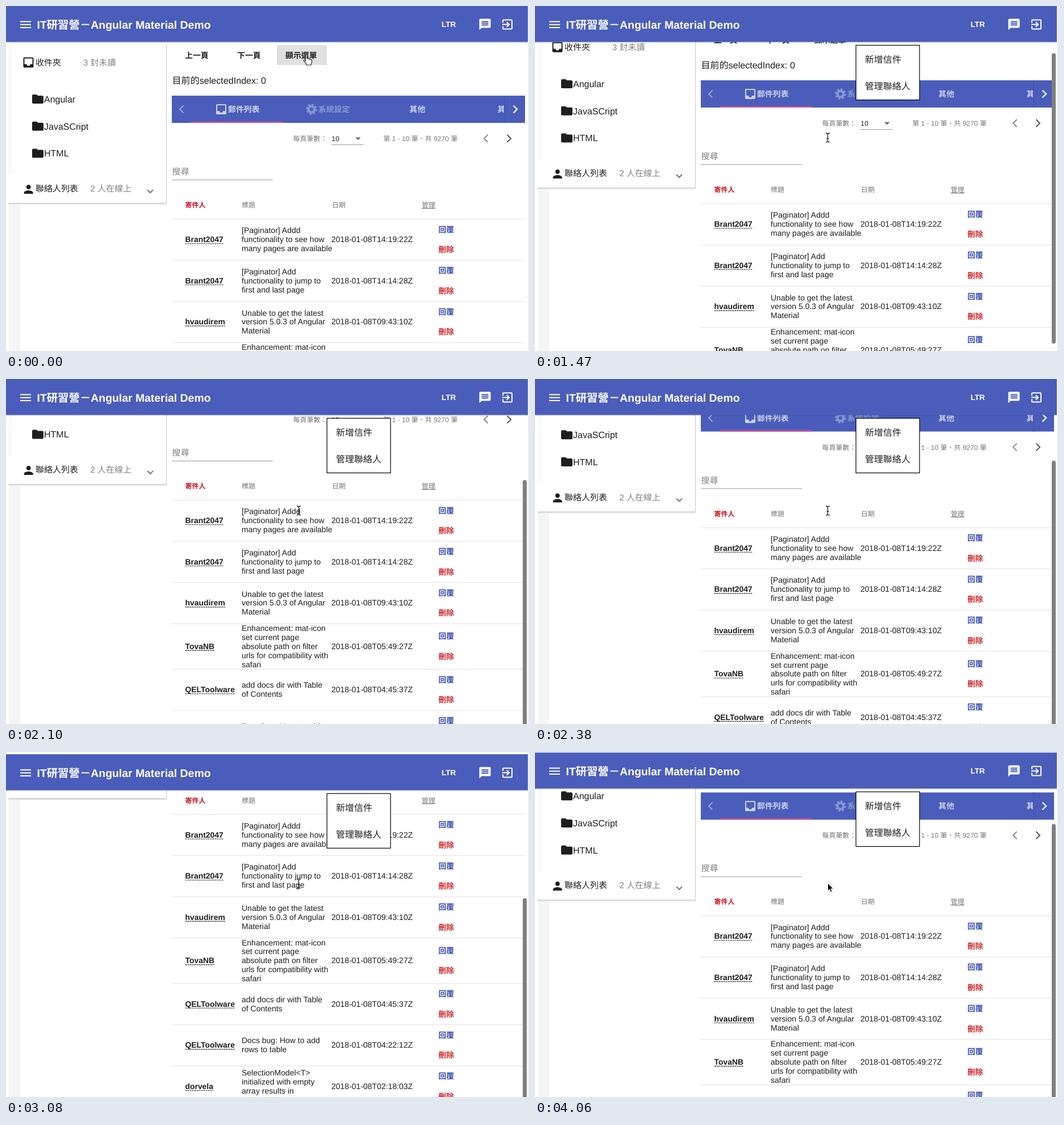
Recreate the animation shown at these times as an HTML page. Size 921 by 608 pixels, loop 4130 ms.

```html
<!DOCTYPE html>
<html lang="zh-Hant">
<head>
<meta charset="utf-8">
<style>
html, body { margin: 0; width: 100%; height: 100%; overflow: hidden; background: #fff; }
svg { display: block; width: 921px; height: 608px; text-rendering: geometricPrecision;
  font-family: 'Liberation Sans', 'Noto Sans CJK TC', 'Noto Sans CJK', sans-serif; }
</style>
</head>
<body>
<svg id="stage" viewBox="0 0 921 608"></svg>
<script>
const LOOP = 4130, STEP = 70, BLUE = '#4a5dba', INK = '#1e1e1e', GRAY = '#808080', PALE = '#cdd3ec';

const text = (x, y, s, size = 14, fill = INK, weight = 400, more = '') =>
  `<text x="${x}" y="${y}" font-size="${size}" fill="${fill}" font-weight="${weight}" ${more}>${s}</text>`;
const rect = (x, y, w, h, fill, more = '') =>
  `<rect x="${x}" y="${y}" width="${w}" height="${h}" fill="${fill}" ${more}/>`;
const stroke = (d, color, width = 1, more = '') =>
  `<path d="${d}" fill="none" stroke="${color}" stroke-width="${width}" ${more}/>`;
const icon = (name, x, y, fill = INK) =>
  `<path d="${ICONS[name]}" fill="${fill}" transform="translate(${x} ${y})"/>`;

const ICONS = {
  menu: 'M2.5 18.5h19v-2h-19zM2.5 13.3h19v-2h-19zM2.5 6v2h19V6z',
  message: 'M20 2H4c-1.1 0-2 .9-2 2v18l4-4h14c1.1 0 2-.9 2-2V4c0-1.1-.9-2-2-2zm-2 12H6v-2h12zm0-3H6V9h12zm0-3H6V6h12z',
  exit: 'M10.1 15.6L11.5 17l5-5-5-5-1.4 1.4L12.7 11H3v2h9.7zM19 3H5c-1.1 0-2 .9-2 2v4h2V5h14v14H5v-4H3v4c0 1.1.9 2 2 2h14c1.1 0 2-.9 2-2V5c0-1.1-.9-2-2-2z',
  inbox: 'M19 3H5c-1.1 0-2 .9-2 2v14c0 1.1.9 2 2 2h14c1.1 0 2-.9 2-2V5c0-1.1-.9-2-2-2zm0 12h-4c0 1.7-1.4 3-3 3s-3-1.3-3-3H5V5h14z',
  folder: 'M10 4H4c-1.1 0-2 .9-2 2v12c0 1.1.9 2 2 2h16c1.1 0 2-.9 2-2V8c0-1.1-.9-2-2-2h-8z',
  person: 'M12 12c2.2 0 4-1.8 4-4s-1.8-4-4-4-4 1.8-4 4 1.8 4 4 4zm0 2c-2.7 0-8 1.3-8 4v2h16v-2c0-2.7-5.3-4-8-4z'
};

const ROWS = [
  ['Brant2047', '14:19:22', '[Paginator] Addd|functionality to see how|many pages are available'],
  ['Brant2047', '14:14:28', '[Paginator] Add|functionality to jump to|first and last page'],
  ['hvaudirem', '09:43:10', 'Unable to get the latest|version 5.0.3 of Angular|Material'],
  ['TovaNB', '05:49:27', 'Enhancement: mat-icon|set current page|absolute path on filter|urls for compatibility with|safari'],
  ['QELToolware', '04:45:37', 'add docs dir with Table|of Contents'],
  ['QELToolware', '04:22:12', 'Docs bug: How to add|rows to table'],
  ['dorvela', '02:18:03', 'SelectionModel&lt;T&gt;|initialized with empty|array results in|selected items']
];

function sidePanel() {
  const folders = ['Angular', 'JavaSCript', 'HTML'].map((name, i) => {
    const y = 152 + i * 47.7;
    return icon('folder', 44, y) + text(67, y + 18, name, 16);
  });
  return rect(5, 350, 20, 800, '#f5f5f5') +
    rect(4, 68, 279, 280.5, '#c8c8c8', 'rx="2"') + rect(4, 68, 278, 279, '#fff') +
    rect(4, 348.5, 279, 1.5, '#e6e6e6') +
    rect(4, 68, 8, 229, '#fafafa') +
    icon('inbox', 27.5, 87.5) + text(52, 104.5, '收件夾', 15) + text(136, 104.5, '3 封未讀', 15, GRAY) +
    folders.join('') +
    icon('person', 27.7, 311) + text(52, 327, '聯絡人列表', 15) + text(148.5, 327, '2 人在線上', 15, GRAY) +
    stroke('M249 324l5 5 5-5', '#777', 2);
}

function tabs() {
  const gear = `<g fill="none" stroke="#fff" opacity=".35"><circle cx="538" cy="182" r="5.2" stroke-width="4"/>
    <circle cx="538" cy="182" r="8" stroke-width="3.4" stroke-dasharray="3.4 2.883"/></g>`;
  return rect(292, 158, 622, 48, BLUE) +
    stroke('M312.5 175.5l-6.5 6.5 6.5 6.5', '#fff', 2, 'opacity=".45"') +
    icon('inbox', 367, 170, PALE) + text(391, 187, '郵件列表', 13.9, PALE, 700) +
    rect(326, 203.5, 162, 2.5, '#c9509c') + gear +
    text(550, 187, '系統設定', 13.9, '#fff', 700, 'opacity=".35"') +
    text(710.5, 187, '其他', 13.9, PALE, 700) + text(865.5, 187, '其', 13.9, PALE, 700) +
    rect(877, 158, 2, 48, '#4456b0') +
    stroke('M893.5 175.5l6.5 6.5-6.5 6.5', '#fff', 2.2);
}

function table() {
  let y = 375;
  const head = text(315.5, 355, '寄件人', 12, '#c8101c', 700) + text(415, 355, '標題', 12, '#777') +
    text(574, 355, '日期', 12, '#777') + text(732, 355, '管理', 12, '#777', 400, 'text-decoration="underline"');
  return head + ROWS.map(([name, time, title]) => {
    const lines = title.split('|'), h = lines.length > 4 ? 80.3 : 72.6, mid = y + h / 2 + .2;
    const out = rect(292, y, 622, 1, '#e2e2e2') +
      text(315.5, mid + 4.7, name, 13.9, INK, 700, 'class="name"') +
      lines.map((s, i) => text(415, mid + 4.7 + (i - (lines.length - 1) / 2) * 15.9, s)).join('') +
      text(573, mid + 4.7, `2018-01-08T${time}Z`) +
      text(761.5, mid - 13, '回覆', 13.8, '#3d4fae', 700) + text(761.5, mid + 22.7, '刪除', 13.8, '#cf2a30', 700);
    y += h;
    return out;
  }).join('') + rect(292, y, 622, 1, '#e2e2e2');
}

const content = sidePanel() +
  rect(477, 69, 88, 35, '#e0e0e0', 'id="hover"') +
  text(315, 91.5, '上一頁', 13.9, INK, 700) + text(407, 91.5, '下一頁', 13.9, INK, 700) +
  text(492, 91.5, '顯示選單', 13.9, INK, 700) +
  text(292.5, 137, '目前的selectedIndex: 0', 16.1) + tabs() +
  text(505.5, 238, '每頁筆數：', 12, '#777') + text(573.5, 238, '10', 12) +
  '<path d="M615 231.5h10l-5 5z" fill="#757575"/>' + rect(573, 244, 56, 1, '#999') +
  text(664.5, 238, '第 1 - 10 筆、共 9270 筆', 12, '#777') +
  stroke('M848.5 227l-6.5 6.5 6.5 6.5', '#888', 2) + stroke('M882.5 227l6.5 6.5-6.5 6.5', '#555', 2) +
  text(292.5, 297, '搜尋', 15, GRAY) + rect(292, 306, 178, 1, '#999') + table();

const header = rect(0, -10, 921, 10, '#fff') + rect(0, 63.5, 919, 2, '#000', 'opacity=".08"') +
  rect(0, 0, 919, 63.5, BLUE) + icon('menu', 22.5, 20.5, '#fff') +
  text(54.5, 40, 'IT研習營－Angular Material Demo', 19.4, '#fff', 700) +
  text(767, 37, 'LTR', 13.5, '#fff', 700) +
  icon('message', 831.5, 20.5, '#fff') + icon('exit', 871, 20.5, '#fff');

const menu = rect(565.2, 69.2, 112, 96.3, '#fff', 'stroke="#000" stroke-width="1.2"') +
  text(581, 99.5, '新增信件', 16) + text(581, 147, '管理聯絡人', 16);

// Pointer shapes with the hot spot at 0,0
const pointers = {
  hand: '<path d="M-3.5-7c0-2 2.6-2 2.6 0v5.5c2-1 3 0 3 1 1.5-.8 2.7 0 2.7 1 1.5-.6 2.7.2 2.7 1.5v3c0 2-1.5 2.5-1.5 5h-7.5c0-2.5-4-5-5-7.5-.6-1.8 1.5-2.5 3 0z" fill="#fff" stroke="#222" stroke-width="1.2"/>',
  beam: stroke('M-3.5-8q3.5 0 3.5 2.5v11q0 2.5-3.5 2.5M3.5-8q-3.5 0-3.5 2.5v11q0 2.5 3.5 2.5M-2 1.5h4', '#222', 1.3),
  arrow: '<path d="M0-1v14l3.2-3 2.2 5 2.4-1-2.2-4.9h4.4z" fill="#111" stroke="#fff"/>'
};

const stage = document.getElementById('stage');
stage.innerHTML = `<g id="content">${content}</g><g id="header">${header}</g><g id="menu">${menu}</g>` +
  rect(910, 0, 7, 512, '#808080', 'id="thumb" rx="3.5"') + rect(919, 0, 2, 608, '#f0f0f0') +
  '<g id="pointer">' + Object.keys(pointers).map(k => `<g id="${k}">${pointers[k]}</g>`).join('') + '</g>';
const el = id => document.getElementById(id);
const show = (id, on) => el(id).setAttribute('visibility', on ? 'visible' : 'hidden');
const move = (id, x, y) => el(id).setAttribute('transform', `translate(${x} ${y})`);

// Dashed underline as wide as each sender's name
document.querySelectorAll('.name').forEach(n => {
  const y = +n.getAttribute('y') + 2.5;
  n.insertAdjacentHTML('afterend',
    stroke(`M315.5 ${y}h${n.getComputedTextLength()}`, INK, 1.1, 'stroke-dasharray="3 1"'));
});

// Smooth curve through [time, value] keys, flat at turning points
function curve(keys, t) {
  const last = keys.length - 1;
  if (t <= keys[0][0]) return keys[0][1];
  if (t >= keys[last][0]) return keys[last][1];
  const slope = i => {
    if (i === 0 || i === last) return 0;
    const [a, b, c] = keys.slice(i - 1, i + 2);
    return (b[1] - a[1]) * (c[1] - b[1]) <= 0 ? 0 : (c[1] - a[1]) / (c[0] - a[0]);
  };
  const i = keys.findIndex(k => k[0] > t) - 1;
  const [t0, v0] = keys[i], [t1, v1] = keys[i + 1], d = t1 - t0, u = (t - t0) / d;
  const s = u * u * (3 - 2 * u);
  return v0 + (v1 - v0) * s + d * u * (1 - u) * (slope(i) * (1 - u) - slope(i + 1) * u);
}

const SCROLL = [[1190, 0], [1470, 27], [2100, 162], [2240, 175], [2590, 0], [2660, 0], [2730, 2],
  [3080, 269.5], [3150, 275], [3640, 159], [4060, 87.7], [4130, 80]];
const BOUNCE = [[2520, 0], [2660, 4], [3920, 4], [4060, 1]];

function draw(now) {
  const t = Math.floor(now % LOOP / STEP) * STEP;
  const scroll = curve(SCROLL, t), shift = curve(BOUNCE, t);
  const x = curve([[630, 531], [1120, 515.5]], t), y = curve([[630, 94], [1120, 232]], t);
  const over = y < 104, beam = t >= 1120 && t < 3360;
  move('content', 0, shift - scroll);
  move('header', 0, shift);
  move('menu', 0, shift);
  move('thumb', 0, 64 + shift + scroll * .703);
  move('pointer', x, y);
  show('hover', over);
  show('menu', t >= 490);
  show('thumb', t >= 1120);
  show('hand', over);
  show('beam', beam);
  show('arrow', !over && !beam);
  requestAnimationFrame(draw);
}
draw(0);
</script>
</body>
</html>
```
